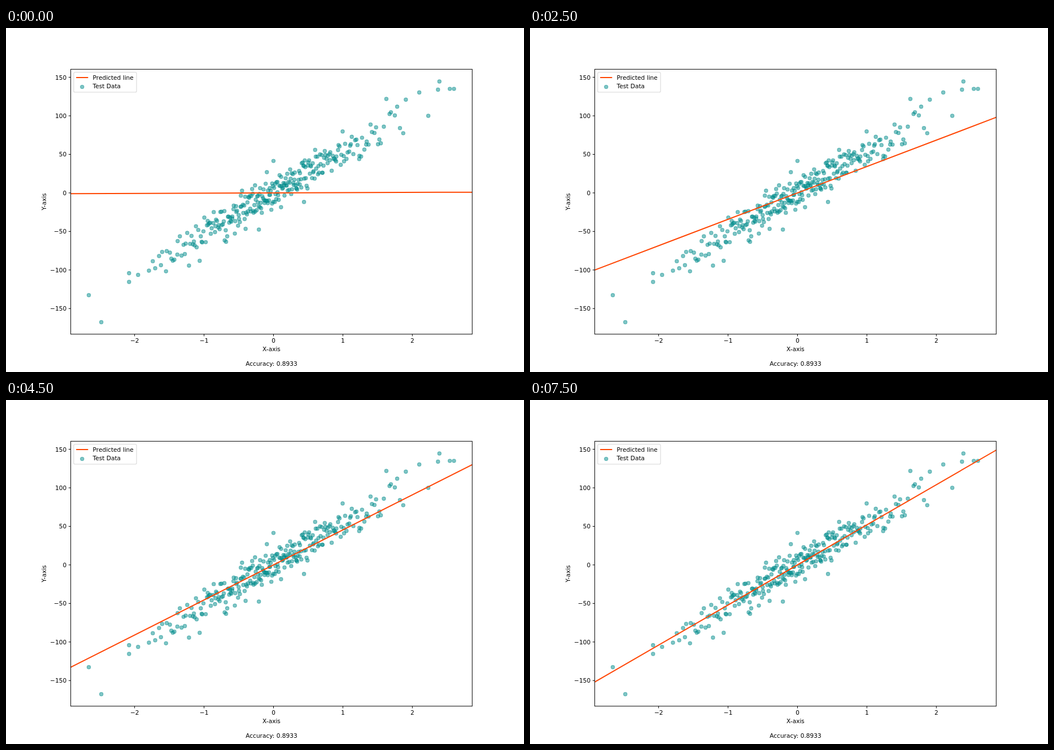
An HTML page for the animation above (8 s loop, 917 px wide and 611 px high).

```html
<!DOCTYPE html>
<html>
<head>
<meta charset="utf-8">
<style>
html, body { margin: 0; width: 100%; height: 100%; overflow: hidden; background: #fff; }
svg { display: block; }
text { font: 10.6px "DejaVu Sans", sans-serif; fill: #000; }
.axis { fill: none; stroke: #000; stroke-width: 1; }
.dot { fill: #008b8b; stroke: #008b8b; fill-opacity: .5; stroke-opacity: .5; stroke-width: 1.06; }
.fit { stroke: #ff4500; stroke-width: 2; }
.legend { fill: #fff; fill-opacity: .8; stroke: #ccc; stroke-opacity: .8; stroke-width: 1.06; }
</style>
</head>
<body>
<svg id="plot" width="917" height="611" viewBox="0 0 917 611">
  <clipPath id="area"><rect x="114.6" y="73.3" width="710.7" height="470.5"/></clipPath>
</svg>
<script>
const plot = document.getElementById('plot');
const LEFT = 114.6, RIGHT = 825.3, TOP = 73.3, BOTTOM = 543.8;
const ORIGIN_X = 473.5, ORIGIN_Y = 292.9, UNIT_X = 122.9, UNIT_Y = 1.369;
const SLOPE = 55, NOISE = 11.5;

function add(tag, attrs, text) {
  const el = document.createElementNS('http://www.w3.org/2000/svg', tag);
  for (const key in attrs) el.setAttribute(key, attrs[key]);
  if (text) el.textContent = text;
  return plot.appendChild(el);
}
const label = (x, y, text, anchor = 'middle', extra = {}) =>
  add('text', { x, y, 'text-anchor': anchor, ...extra }, text);
const dot = (cx, cy) => add('circle', { cx, cy, r: 3.18, class: 'dot' });
const toX = v => ORIGIN_X + v * UNIT_X;
const toY = v => ORIGIN_Y - v * UNIT_Y;
const signed = v => String(v).replace('-', '\u2212');

// A few outlying samples in data units
const outliers = [
  [-2.66, -132.7], [-2.48, -167.7], [-2.08, -115.5], [-2.08, -104.2], [-1.95, -106.4],
  [2.1, 130.3], [2.23, 100], [2.37, 134], [2.39, 144.6], [2.54, 135], [2.6, 135],
  [0, 41.5], [0.44, -11.8], [-0.21, -47.6]
];
for (const [x, y] of outliers) dot(toX(x), toY(y));

// The cloud: evenly spread quantiles of a bell-shaped x, noisy y around the true slope
let seed = 4217;
const random = () => (seed = seed * 16807 % 2147483647) / 2147483647;
const bell = () => (random() + random() + random() + random() - 2) * Math.sqrt(3);
const COUNT = 286;
for (let i = 0; i < COUNT; i++) {
  const p = 0.045 + 0.92 * (i + random()) / COUNT;
  const x = Math.log(p / (1 - p)) / 1.702;
  dot(toX(x), toY(x * SLOPE + bell() * NOISE));
}

const fit = add('line', { x1: LEFT, x2: RIGHT, class: 'fit', 'clip-path': 'url(#area)' });

add('rect', { x: LEFT, y: TOP, width: RIGHT - LEFT, height: BOTTOM - TOP, class: 'axis' });
for (let v = -2; v <= 2; v++) {
  add('path', { d: `M${toX(v)} ${BOTTOM}v3.7`, class: 'axis' });
  label(toX(v), 559.3, signed(v));
}
for (let v = -150; v <= 150; v += 50) {
  add('path', { d: `M${LEFT} ${toY(v)}h-3.7`, class: 'axis' });
  label(107.2, toY(v) + 4, signed(v), 'end');
}
label(470, 574.2, 'X-axis');
label(0, 0, 'Y-axis', 'middle', { transform: 'translate(71 308.5) rotate(-90)' });
label(470, 599.6, 'Accuracy: 0.8933');

add('rect', { x: 119.9, y: 78.7, width: 111.2, height: 35.3, rx: 2.1, class: 'legend' });
add('line', { x1: 124.2, x2: 145.4, y1: 88, y2: 88, class: 'fit' });
dot(134.8, 104.6);
label(153.6, 92, 'Predicted line', 'start');
label(153.6, 107.2, 'Test Data', 'start');

// Gradient descent: the gap to the final slope shrinks by a fixed ratio each step
function draw(now) {
  const step = Math.floor(now % 8000 / 500);
  const drop = 220 - 218.7 * 0.824 ** step;
  fit.setAttribute('y1', ORIGIN_Y + drop);
  fit.setAttribute('y2', ORIGIN_Y - drop * (RIGHT - ORIGIN_X) / (ORIGIN_X - LEFT));
}
const start = performance.now();
function tick() {
  draw(performance.now() - start);
  requestAnimationFrame(tick);
}
tick();
</script>
</body>
</html>
```
